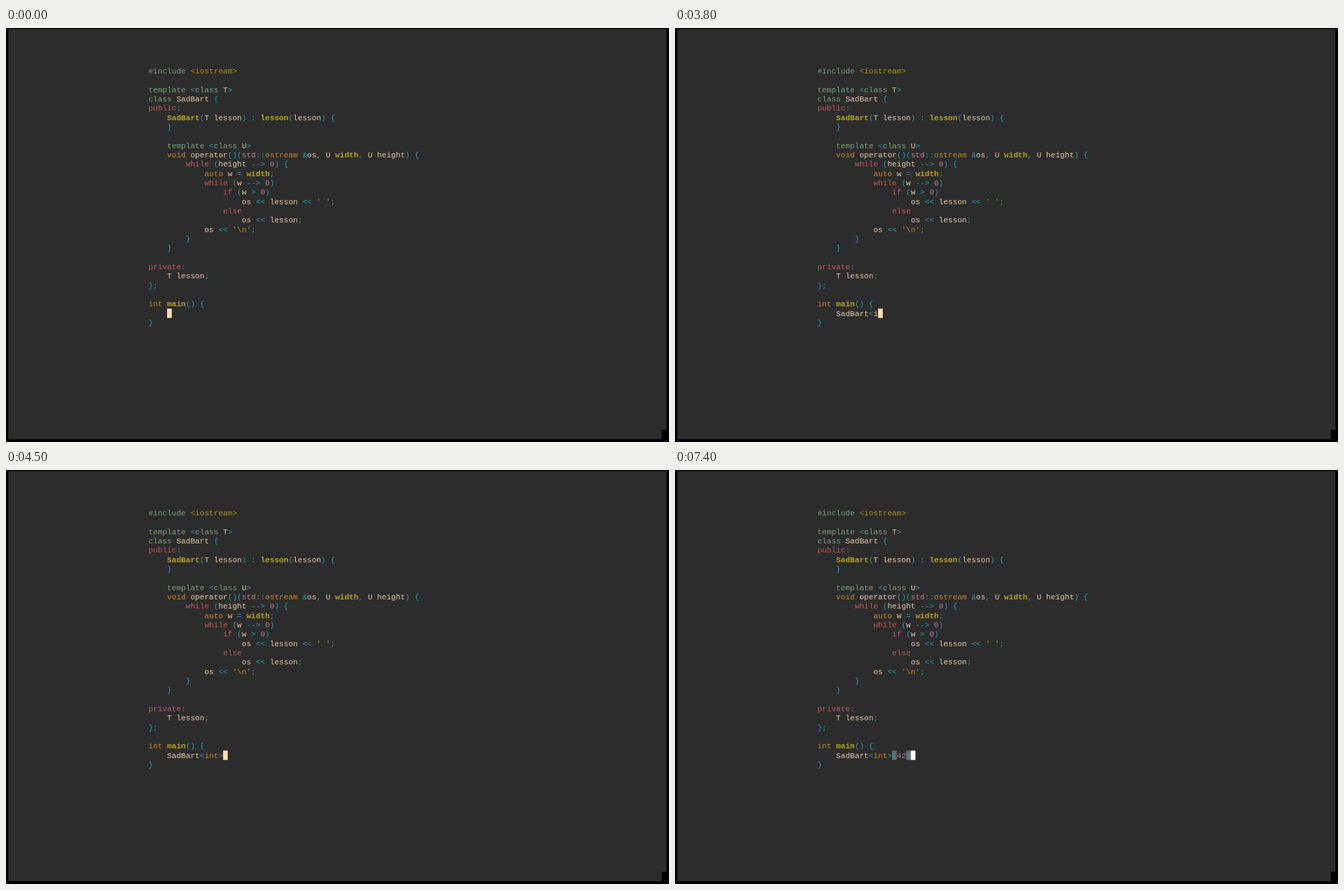
Write an HTML page with a canvas that moves like this. It is 947x592 px and loops after 8000 ms.

```html
<!DOCTYPE html>
<html lang="en">
<head>
<meta charset="utf-8">
<title>Typing a C++ constructor call</title>
<style>
  html, body { margin: 0; width: 947px; height: 592px; overflow: hidden; background: #000; }
  canvas { display: block; }
</style>
</head>
<body>
<canvas width="947" height="592"></canvas>
<script>
const ctx = document.querySelector('canvas').getContext('2d');
const LOOP = 8000;
const COL = 20 / 3, ROW = 40 / 3, LEFT = 203.4, TOP = 54.6;
const FONT = '11.11px "Liberation Mono", "DejaVu Sans Mono", monospace';
const INK = 0.88; // softens the strokes to a light type weight
const C = {
  bg: '#2c2c2c', cream: '#ffdfaf', green: '#87af87', olive: '#b8a50c', red: '#d7625f',
  orange: '#e0931c', cyan: '#1fb4c0', yellow: '#cdb70e', pink: '#d3869b',
  menu: '#565656', thumb: '#808080', selected: '#87afb4', match: '#64686a', white: '#ffffff'
};

const HEAD = String.raw`#include <iostream>

template <class T>
class SadBart {
public:
    SadBart(T lesson) : lesson(lesson) {
    }

    template <class U>
    void operator()(std::ostream &os, U width, U height) {
        while (height --> 0) {
            auto w = width;
            while (w --> 0)
                if (w > 0)
                    os << lesson << ' ';
                else
                    os << lesson;
            os << '\n';
        }
    }

private:
    T lesson;
};

int main() {`.split('\n');
const EDIT_ROW = HEAD.length;

// Highlighting rules, tried in order at each position; the last flag means bold.
const RULES = [
  [/<iostream>|'/y, C.olive],
  [/#include|\b(template|class)\b/y, C.green],
  [/\b(public|private|while|if|else)\b/y, C.red],
  [/\b(void|auto|int|ostream)\b|\\n/y, C.orange],
  [/\b(SadBart|lesson)(?=\()|\b(width|main)\b|\bin$/y, C.yellow, true],
  [/\bstd\b|\d+/y, C.pink],
  [/\w+/y, C.cream],
  [/\s+/y, null],
  [/./y, C.cyan]
];

const MEMBER_MENU = {
  col: 11, width: 88, thumbRows: 7,
  items: [
    ...['assignable', 'constructible', 'copy_assignable', 'move_assignable', 'copy_constructible',
      'move_constructible', 'default_constructible'].map(s => 'is_nothrow_' + s),
    'in', 'int', 'inline',
    'inc'.padEnd(33) + '<snip> (inc) "#include local header (inc)"',
    'Inc'.padEnd(33) + '<snip> (Inc) "#include <> (Inc)"'
  ]
};
const CLASS_MENU = { col: 3, width: 16, items: ['SadBart'] };
const ARGS_MENU = { col: 16, width: 22, items: ['int lesson', 'const SadBart<int> &', 'SadBart<int> &&'] };

// Each step holds until the next one starts.
const STEPS = [
  { at: 0, text: '' },
  { at: 1300, text: 'S' },
  { at: 1600, text: 'Sa', menu: CLASS_MENU },
  { at: 2300, text: 'SadBart', menu: { ...CLASS_MENU, selected: 0 }, cursor: C.white },
  { at: 2800, text: 'SadBart', menu: { ...CLASS_MENU, width: 20 } },
  { at: 3300, text: 'SadBart<' },
  { at: 3800, text: 'SadBart<i' },
  { at: 4000, text: 'SadBart<in', menu: MEMBER_MENU },
  { at: 4200, text: 'SadBart<int', menu: MEMBER_MENU },
  { at: 4400, text: 'SadBart<int>' },
  { at: 5100, text: 'SadBart<int>()', back: 1, cursor: C.white },
  { at: 5200, text: 'SadBart<int>()', back: 1, cursor: C.white, menu: ARGS_MENU },
  { at: 6400, text: 'SadBart<int>(4)', back: 1, cursor: C.white },
  { at: 6600, text: 'SadBart<int>(42)', back: 1, cursor: C.white },
  { at: 7300, text: 'SadBart<int>(42)', cursor: C.white, matched: [16, 19] }
];

const xOf = col => LEFT + col * COL;
const yOf = row => TOP + row * ROW;

function fillCells(col, row, cols, rows, color) {
  ctx.fillStyle = color;
  ctx.fillRect(xOf(col), yOf(row), cols * COL, rows * ROW);
}

function write(text, col, row, color, bold) {
  ctx.font = (bold ? 'bold ' : '') + FONT;
  ctx.fillStyle = color;
  ctx.globalAlpha = INK;
  [...text].forEach((ch, i) => ctx.fillText(ch, xOf(col + i), yOf(row) + 10.3));
  ctx.globalAlpha = 1;
}

function writeCode(line, row) {
  for (let pos = 0; pos < line.length;) {
    for (const [pattern, color, bold] of RULES) {
      pattern.lastIndex = pos;
      const hit = pattern.exec(line);
      if (!hit) continue;
      if (color) write(hit[0], pos, row, color, bold);
      pos += hit[0].length;
      break;
    }
  }
}

function drawMenu({ col, width, items, selected, thumbRows }) {
  const top = EDIT_ROW + 1;
  fillCells(col, top, width, items.length, C.menu);
  items.forEach((item, i) => {
    const active = i === selected;
    if (active) fillCells(col, top + i, width, 1, C.selected);
    write(item, col + 1, top + i, active ? C.menu : C.cream, active);
  });
  if (thumbRows) fillCells(col + width - 1, top, 1, thumbRows, C.thumb);
}

function draw(time) {
  const step = STEPS.findLast(s => s.at <= time);
  ctx.fillStyle = '#000';
  ctx.fillRect(0, 0, 947, 592);
  fillCells(-30, -4, 141, 44, C.bg);
  fillCells(110, 39, 2, 2, '#000');

  HEAD.forEach(writeCode);
  for (const col of step.matched || []) fillCells(col, EDIT_ROW, 1, 1, C.match);
  const line = '    ' + step.text;
  writeCode(line, EDIT_ROW);
  writeCode('}', EDIT_ROW + 1);

  const cursorCol = line.length - (step.back || 0);
  fillCells(cursorCol, EDIT_ROW, 1, 1, step.cursor || C.cream);
  write(line.slice(cursorCol), cursorCol, EDIT_ROW, C.bg);
  if (step.menu) drawMenu(step.menu);
}

function tick() {
  draw(performance.now() % LOOP);
  requestAnimationFrame(tick);
}
tick();
</script>
</body>
</html>
```
